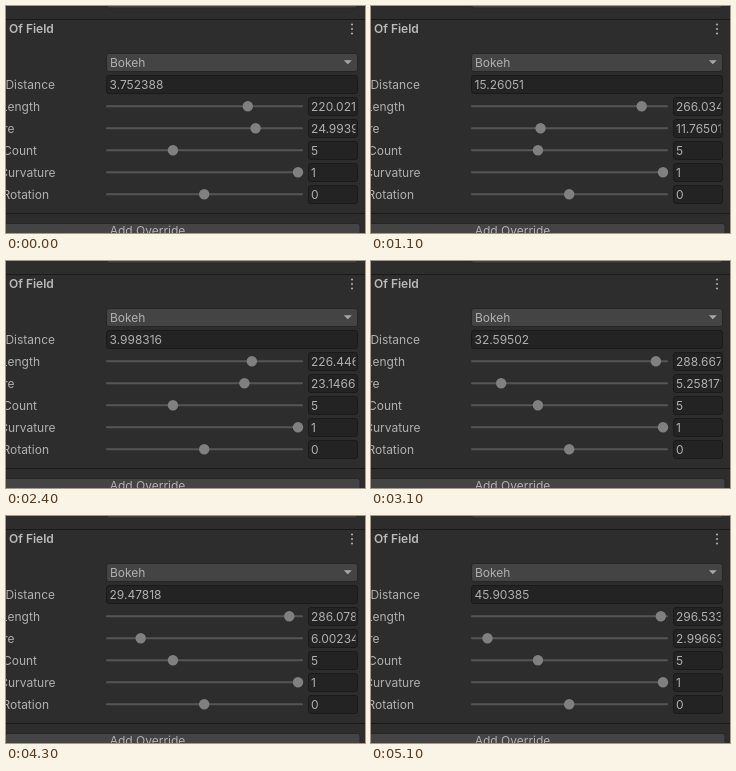
Write an HTML page that moves like this. It is 359 px wide and 227 px high and loops after 5200 ms.

```html
<!DOCTYPE html>
<html lang="en">
<head>
<meta charset="utf-8">
<title>Depth of field settings</title>
<style>
  html, body { margin: 0; width: 100%; height: 100%; overflow: hidden; background: #2d2d2d; }
  svg { display: block; width: 100%; height: 100%; }
  text { font: 12px Inter, Arial, sans-serif; fill: #b0b0b0; white-space: pre; }
  .title { font-weight: 600; fill: #bababa; }
  .end { text-anchor: end; }
  .middle { text-anchor: middle; }
  .field { fill: #232323; stroke: #1a1a1a; }
  .button { fill: #444; stroke: #262626; }
  .track { fill: #555; }
  .knob { fill: #808080; }
  .rule { fill: #1a1a1a; }
  .icon { fill: #a8a8a8; }
</style>
</head>
<body>
<svg id="stage" viewBox="0 0 359 227">
  <defs>
    <clipPath id="inset"><rect x="303" y="90" width="46.5" height="110"/></clipPath>
  </defs>
</svg>
<script>
const LOOP = 5200;
const STEP = 100;
const TRACK = { left: 104.4, span: 187.6 };
const stage = document.getElementById('stage');

function add(tag, attrs, text = '') {
  const el = document.createElementNS('http://www.w3.org/2000/svg', tag);
  for (const name in attrs) el.setAttribute(name, attrs[name]);
  el.textContent = text;
  stage.append(el);
  return el;
}

const box = (cls, x, y, width, height, rx = 2.5) =>
  add('rect', { class: cls, x, y, width, height, rx });
const label = (text, x, mid, cls = '') => add('text', { class: cls, x, y: mid + 4.4 }, text);
const rowMid = row => 56.5 + 22 * row;
const rowBox = (cls, row, x, width) => box(cls, x, rowMid(row) - 9, width, 18);
const format = v => String(Number(v.toPrecision(7)));

function slider(row, name, nameEnd, min, max) {
  const mid = rowMid(row);
  label(name, nameEnd, mid, 'end');
  box('track', 100, mid - 1.2, 197, 2, 1);
  const knob = add('circle', { class: 'knob', cy: mid - 0.2, r: 5.2 });
  rowBox('field', row, 302.5, 49);
  const value = label('', 305, mid);
  value.setAttribute('clip-path', 'url(#inset)');
  return v => {
    knob.setAttribute('cx', TRACK.left + TRACK.span * (v - min) / (max - min));
    value.textContent = format(v);
  };
}

// Neighbouring panel edge and section header
box('button', 100.5, -14.5, 251, 16.5);
box('rule', 0, 13, 359, 1, 0);
label('Of Field', 3, 23, 'title');
for (const dy of [-4.5, 0, 4.5]) add('circle', { class: 'icon', cx: 346, cy: 23 + dy, r: 1.1 });

rowBox('button', 0, 100.5, 251);
label('Bokeh', 104, rowMid(0));
add('path', { class: 'icon', d: 'M337.8 54.3h8l-4 4z' });

label('Distance', 49, rowMid(1), 'end');
rowBox('field', 1, 100.5, 251);
const distance = label('', 103.5, rowMid(1));

const setLength = slider(2, 'Length', 34, 1, 300);
const setAperture = slider(3, 're', 8.5, 1, 32);
slider(4, 'Count', 31, 3, 9)(5);
slider(5, 'Curvature', 49.5, 0, 1)(1);
slider(6, 'Rotation', 43, -180, 180)(0);

box('rule', 0, 207, 359, 1, 0);
box('button', -10, 217.5, 364, 20);
label('Add Override', 141.5, 224.5, 'middle');

// Turning points of the camera move
const keys = [
  { at: 0, zoom: .000265, focus: 3.752388 },
  { at: 500, zoom: .000265, focus: 3.752388 },
  { at: 1100, zoom: .5754345, focus: 15.26051 },
  { at: 1900, zoom: .9615605, focus: 47.07956 },
  { at: 2000, zoom: .945, focus: 44.03172 },
  { at: 2400, zoom: .0805826, focus: 3.998316 },
  { at: 2700, zoom: .01, focus: 3.761284 },
  { at: 3100, zoom: .8583404, focus: 32.59502 },
  { at: 3700, zoom: .03, focus: 3.801957 },
  { at: 4300, zoom: .8259852, focus: 29.47818 },
  { at: 4400, zoom: .932, focus: 41.26407 },
  { at: 5100, zoom: .9566682, focus: 45.90385 }
];

// The picture advances in steps, and regularly holds for one of them
function stepTime(time) {
  const step = Math.floor(time / STEP);
  const held = (step + 2.5) % 3.4 < 1;
  return Math.max(0, held ? step - 1 : step) * STEP;
}

function draw(time) {
  const now = stepTime(time);
  const i = keys.findLastIndex(key => key.at <= now);
  const a = keys[i], b = keys[i + 1] || a;
  const part = (now - a.at) / (b.at - a.at || 1);
  const mix = name => a[name] + (b[name] - a[name]) * part;
  const zoom = mix('zoom');
  distance.textContent = format(mix('focus'));
  setLength(220 + 80 * zoom);
  setAperture(25 - 23 * zoom);
}

const start = performance.now();
function tick() {
  draw((performance.now() - start) % LOOP);
  requestAnimationFrame(tick);
}
tick();
</script>
</body>
</html>
```
